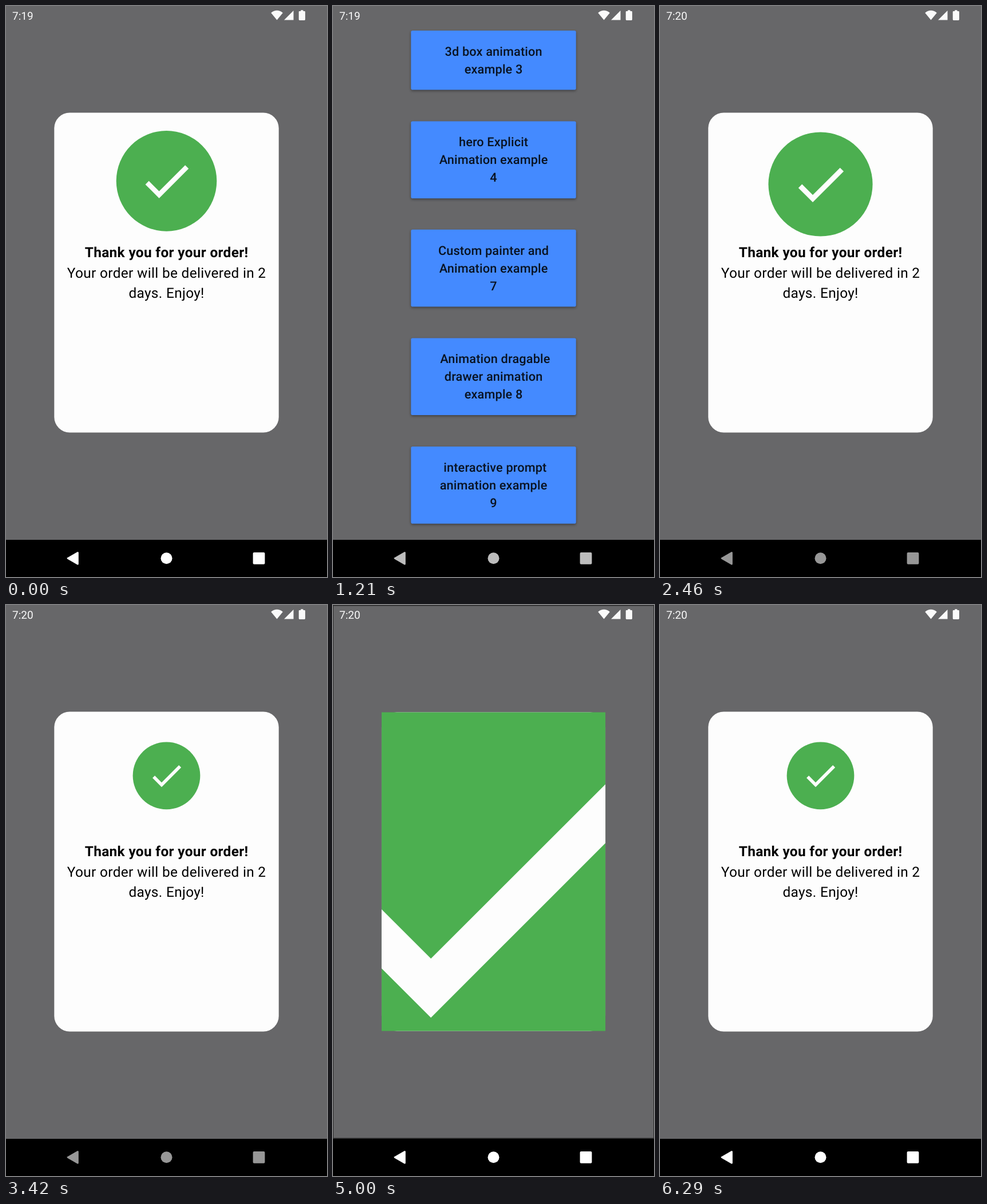
Recreate the animation shown at these times as an HTML page. Size 561 px wide and 998 px high, loop 6.5 s.

```html
<!DOCTYPE html>
<html lang="en">
<head>
<meta charset="utf-8">
<title>Order prompt</title>
<style>
html, body { margin: 0; width: 100%; height: 100%; overflow: hidden; background: #000; }
svg { display: block; width: 100vw; height: 100vh; }
text { font-family: Roboto, sans-serif; text-rendering: geometricPrecision; }
.mid { text-anchor: middle; }
.label { font-size: 21.68px; font-weight: 500; letter-spacing: .16px; fill: #000; fill-opacity: .87; }
.body { font-size: 24.4px; letter-spacing: .34px; fill: #000; }
.button { fill: #448aff; filter: drop-shadow(0 2px 2px rgba(0, 0, 0, .38)); }
</style>
</head>
<body>
<svg viewBox="0 0 561 998">
  <defs>
    <clipPath id="app"><rect width="561" height="933"/></clipPath>
    <clipPath id="cardBox"><rect x="84.3" y="186.5" width="392.4" height="559"/></clipPath>
  </defs>
  <g clip-path="url(#app)">
    <rect width="561" height="933" fill="#676769"/>
    <g id="list"></g>
    <rect id="scrim" width="561" height="933"/>
    <g id="prompt">
      <rect width="561" height="933" fill="#676769"/>
      <rect x="84.3" y="186.5" width="392.4" height="559" rx="27" fill="#fdfdfd"/>
      <g class="mid">
        <text class="body" x="280.6" y="439.3" font-weight="700">Thank you for your order!</text>
        <text class="body" x="280.6" y="474.6">Your order will be delivered in 2</text>
        <text class="body" x="280.6" y="509.6">days. Enjoy!</text>
      </g>
      <g clip-path="url(#cardBox)">
        <g id="badge">
          <circle r="196.2" fill="#4caf50"/>
          <path id="tick" fill="#fdfdfd" d="M9 16.17 4.83 12 3.41 13.41 9 19 21 7 19.59 5.59z"/>
        </g>
      </g>
    </g>
  </g>
  <g fill="#fafafa">
    <text id="clock" x="11" y="24" font-size="19"></text>
    <path d="M473.5 24.6 463.2 11.9Q473.5 3.6 483.8 11.9z"/>
    <path d="M486 24.5H502.5V8z"/>
    <path d="M515.2 7.2h4.2v1.8h2.2q1.3 0 1.3 1.3v13.2q0 1.4-1.3 1.4h-8.6q-1.3 0-1.3-1.4v-13.2q0-1.3 1.3-1.3h2.2z"/>
  </g>
  <rect y="933" width="561" height="65"/>
  <rect id="touch" x="45" y="933" width="145.5" height="65" rx="32.5" fill="#fff"/>
  <g id="nav">
    <path d="M107.3 964.2 124.6 954.2Q126.8 953.3 126.8 955.6V975Q126.8 977.3 124.6 976.4L107.3 966.4Q105.8 965.3 107.3 964.2z"/>
    <circle cx="280.5" cy="965.3" r="10"/>
    <rect x="431.6" y="954.9" width="20.8" height="20.8" rx="2"/>
  </g>
</svg>
<script>
const LOOP = 6500, PUSH = 300, PLAY = 1250;
const backs = [460, 4268], opens = [1457, 4808], starts = [-1062, ...opens];
const el = id => document.getElementById(id);

const buttons = [
  [43, ["3d box animation", "example 3"]],
  [201.5, ["hero Explicit", "Animation example", "4"]],
  [390.8, ["Custom painter and", "Animation example", "7"]],
  [580.4, ["\u00a0Animation dragable", "drawer animation", "example 8"]],
  [770, ["\u00a0interactive prompt", "animation example", "9"]]
];
el("list").innerHTML = buttons.map(([y, lines], i) => {
  const box = `x="136.3" y="${y}" width="288.4" height="${41.4 + 31.1 * lines.length}" rx="2.8"`;
  const lit = i === 4 ? `<rect id="lit" ${box} fill="#6e9ced"/>` : "";
  const text = lines.map((s, n) =>
    `<text class="label mid" x="280.6" y="${y + 43.7 + 31.1 * n}">${s}</text>`).join("");
  return `<rect class="button" ${box}/>${lit}${text}`;
}).join("");

const clamp = x => Math.max(0, Math.min(1, x));
const mix = (a, b, p) => a + (b - a) * p;
const ramp = (t, a, b) => clamp((t - a) / (b - a));

function bezier(x1, y1, x2, y2) {
  const at = (s, a, b) => 3 * a * s * (1 - s) ** 2 + 3 * b * s * s * (1 - s) + s ** 3;
  return x => {
    if (x <= 0 || x >= 1) return clamp(x);
    let lo = 0, hi = 1;
    for (let i = 0; i < 24; i++) {
      const m = (lo + hi) / 2;
      if (at(m, x1, x2) < x) lo = m; else hi = m;
    }
    return at(lo, y1, y2);
  };
}
const easeInOut = bezier(.42, 0, .58, 1);
const zoomIn = bezier(.05, 0, .1333, .06), zoomOut = bezier(.2083, .82, .25, 1);
const zoom = p => p < 1 / 6 ? .4 * zoomIn(p * 6) : .4 + .6 * zoomOut((p - 1 / 6) * 1.2);

function bounceOut(t) {
  const k = 7.5625;
  if (t < 1 / 2.75) return k * t * t;
  if (t < 2 / 2.75) return k * (t - 1.5 / 2.75) ** 2 + .75;
  if (t < 2.5 / 2.75) return k * (t - 2.25 / 2.75) ** 2 + .9375;
  return k * (t - 2.625 / 2.75) ** 2 + .984375;
}

function scalePage(id, s) {
  el(id).setAttribute("transform", `translate(280.5 466.5) scale(${s}) translate(-280.5 -466.5)`);
}

function drawBadge(p) {
  const slide = easeInOut(p);
  el("badge").setAttribute("transform",
    `translate(280.5 ${466 - 167.7 * slide}) scale(${mix(3, .3, bounceOut(p))})`);
  el("tick").setAttribute("transform", `scale(${1.355 * mix(9, 7, slide)}) translate(-12 -12)`);
}

function draw(t) {
  const back = backs.findLast(b => t >= b) ?? -1;
  const open = opens.findLast(o => t >= o) ?? -1;
  let listScale = 1, pageScale = 1, pageAlpha = 1, scrim = 0, lit = 0;
  let play = clamp((t - starts.findLast(s => t >= s)) / PLAY);

  if (back > open) {
    const p = clamp((t - back) / PUSH);
    listScale = mix(1.1, 1, zoom(p));
    pageScale = mix(1, .9, zoom(p));
    pageAlpha = 1 - ramp(p, .0825, .2075);
    const next = opens.find(o => o > t);
    lit = Math.max(1 - ramp(t, back + PUSH, back + PUSH + 180), ramp(t, next - 110, next - 20));
  } else if (open >= 0 && t < open + PUSH) {
    // the incoming page stays frozen until its transition is over
    const p = (t - open) / PUSH;
    play = 0;
    lit = 1;
    listScale = mix(1, 1.05, zoom(p));
    pageScale = mix(.85, 1, zoom(p));
    pageAlpha = ramp(p, .125, .25);
    scrim = .6 * ramp(p, .2075, .4175);
  }

  scalePage("list", listScale);
  scalePage("prompt", pageScale);
  el("prompt").setAttribute("opacity", pageAlpha);
  el("scrim").setAttribute("opacity", scrim);
  el("lit").setAttribute("opacity", lit);
  drawBadge(play);

  el("clock").textContent = t < 1420 ? "7:19" : "7:20";
  const dim = ramp(t, 1000, 1330) - ramp(t, 4130, 4200);
  const shade = Math.round(mix(255, 151, dim));
  el("nav").setAttribute("fill", `rgb(${shade},${shade},${shade})`);
  const touch = Math.max(...backs.map(b => ramp(t, b - 100, b) - ramp(t, b, b + 400)));
  el("touch").setAttribute("opacity", .14 * touch);
}

function tick() {
  draw(performance.now() % LOOP);
  requestAnimationFrame(tick);
}
tick();
</script>
</body>
</html>
```
